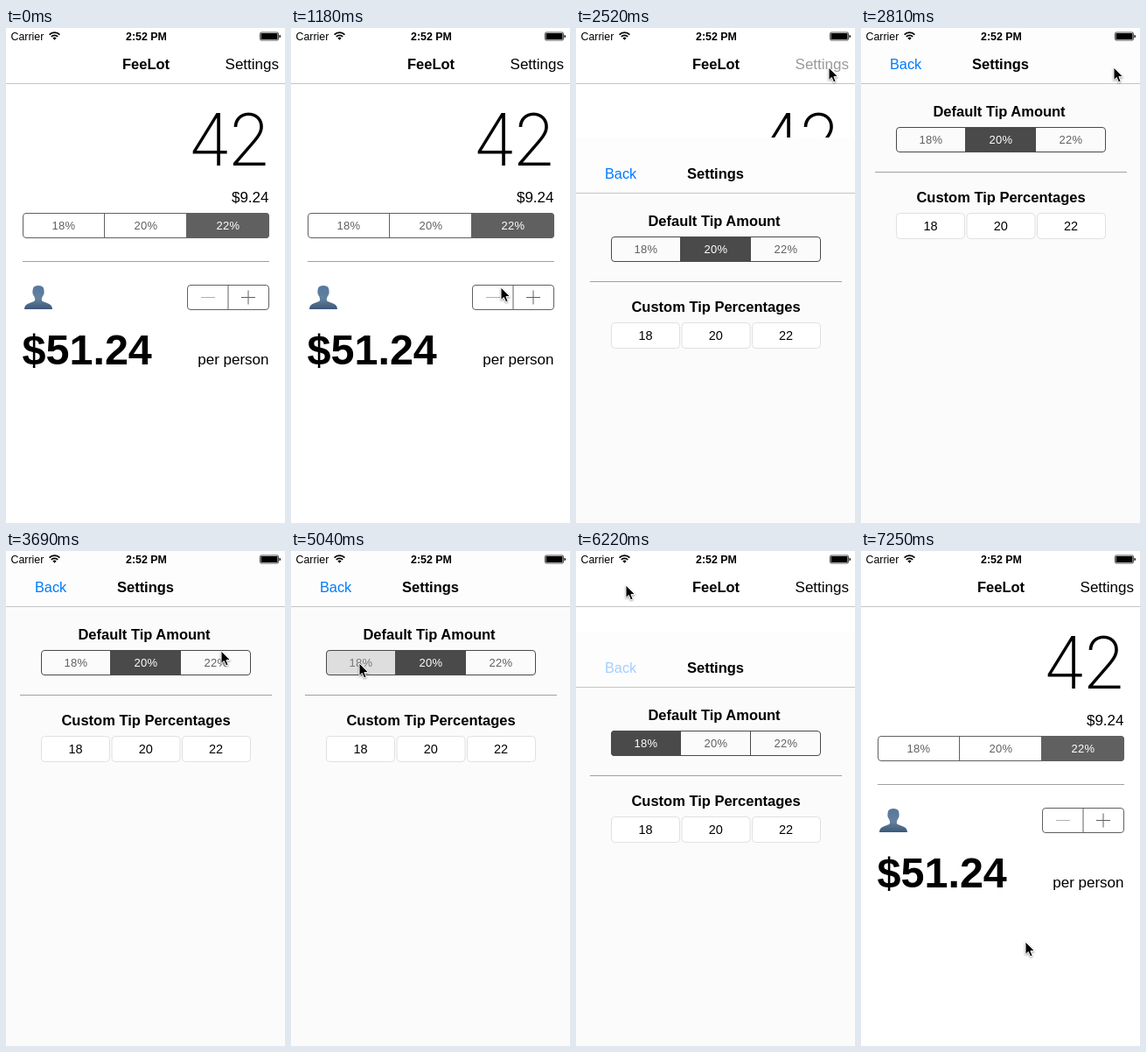
These frames come from a looping animation (319 by 565 pixels, 8 s). An HTML page:

```html
<!DOCTYPE html>
<html lang="en">
<head>
<meta charset="utf-8">
<title>Tip calculator</title>
<style>
  html, body { margin: 0; width: 100%; height: 100%; overflow: hidden; background: #fff; }
  svg { display: block; font: 17px "Liberation Sans", Arial, sans-serif; }
  .bold { font-weight: bold; font-size: 16.5px; }
  .mid { text-anchor: middle; }
  .end { text-anchor: end; }
  .status { font-size: 12.4px; }
  .seg { font-size: 13px; letter-spacing: .3px; }
  .field { font-size: 14.5px; }
  .amount { font: 200 82px Inter, Roboto, sans-serif; }
  .total { font-size: 48.5px; font-weight: bold; }
  #cursor { filter: drop-shadow(0 1px 1px rgba(0, 0, 0, .4)); }
</style>
</head>
<body>
<svg width="319" height="565" viewBox="0 0 319 565">
  <defs>
    <linearGradient id="blue" x2="0" y2="1">
      <stop stop-color="#56779c"/><stop offset=".55" stop-color="#64819f"/><stop offset="1" stop-color="#3c5878"/>
    </linearGradient>
  </defs>

  <g id="main">
    <path d="M0 63.5H319" stroke="#c4c4c4"/>
    <text class="bold mid" x="160" y="47">FeeLot</text>
    <text id="open" class="end" x="312" y="47">Settings</text>
    <text class="amount mid" x="233 278" y="157">42</text>
    <text class="end" x="300.5" y="198.5">$9.24</text>
    <g id="tips"></g>
    <path d="M19 266.5H301" stroke="#a0a0a0"/>
    <path fill="url(#blue)" d="M21 321C21 315 27 314 32 312C34 311 33 308 32 306C30 304 30 301 31 297C32 293 42 293 43 297C44 301 44 304 42 306C41 308 40 311 42 312C47 314 53 315 53 321Z"/>
    <g fill="none" stroke="#606060">
      <rect x="207.5" y="293.5" width="93" height="28" rx="3.5"/>
      <path d="M254 293.5V321.5M269 307.5H285M277 299.5V315.5"/>
      <path d="M223 307.5H239" stroke="#b0b0b0"/>
    </g>
    <text class="total" x="18.5" y="384">$51.24</text>
    <text class="end" x="300.5" y="383.5">per person</text>
  </g>

  <g id="panel">
    <rect width="319" height="566" fill="#fbfbfb"/>
    <rect width="319" height="63" fill="#fdfdfd"/>
    <path d="M0 63.5H319" stroke="#c4c4c4"/>
    <text id="back" x="33" y="47" font-size="16.3" fill="#007aff">Back</text>
    <text class="bold mid" x="159.5" y="47">Settings</text>
    <text class="bold mid" x="158" y="100.5">Default Tip Amount</text>
    <g id="defaults"></g>
    <path d="M16 164.5H304" stroke="#a0a0a0"/>
    <text class="bold mid" x="160" y="198.5">Custom Tip Percentages</text>
    <g id="fields"></g>
  </g>

  <g class="status">
    <text x="5.5" y="14">Carrier</text>
    <text class="mid" x="160.5" y="14" font-weight="bold">2:52 PM</text>
    <g fill="none" stroke="#000" stroke-width="1.7">
      <path d="M49.6 7.6A8.2 8.2 0 0 1 61.4 7.6M51.8 9.9A5.2 5.2 0 0 1 59.2 9.9"/>
    </g>
    <path d="M53.4 11.6A3 3 0 0 1 57.6 11.6L55.5 13.8Z"/>
    <rect x="290.5" y="5" width="21" height="9" rx="1.5" fill="none" stroke="#000" stroke-width=".7"/>
    <rect x="291.5" y="6" width="19" height="7" rx=".6"/>
    <path d="M312.5 7.8Q314 8 314 9.5T312.5 11.2Z"/>
  </g>

  <path id="cursor" d="M0 0V14.5L3.3 11.5L5.6 16.9L8.1 15.8L5.9 10.6H10.6Z" stroke="#fff" stroke-width="1"/>
</svg>
<script>
const $ = id => document.getElementById(id);
const LOOP = 8000, STEPS = 54;
const rates = [18, 20, 22];

// Screen updates come in even steps; keys are [step, ...values].
const path = [
  [2, 56, 528], [3, 78, 506], [5, 133, 461], [7, 133, 461],
  [8, 240, 296], [9, 280, 150], [10, 301, 75], [11, 297, 50], [12, 289, 45], [20, 289, 45],
  [21, 284, 55], [23, 253, 103], [25, 239, 125], [30, 239, 125],
  [31, 215, 135], [32, 150, 142], [33, 90, 133], [34, 78, 128], [37, 78, 128],
  [38, 73, 103], [39, 60, 54], [40, 57, 39], [45, 57, 39],
  [46, 75, 92], [47, 135, 280], [48, 178, 412], [49, 188, 446]
];
const slide = [
  [15, 566], [16, 441], [17, 125], [18, 16], [19, 0],
  [41, 0], [42, 92], [43, 385], [44, 566]
];

function at(keys, n) {
  const i = keys.findIndex(k => k[0] > n);
  if (i < 1) return keys.at(i).slice(1);
  const a = keys[i - 1], b = keys[i], p = (n - a[0]) / (b[0] - a[0]);
  return a.slice(1).map((v, j) => v + (b[j + 1] - v) * p);
}

// Segmented control with one chosen and possibly one pressed segment.
function segments(x, y, w, color, chosen, pressed = -1) {
  const cell = w / 3, r = 4, h = 29;
  const shape = [
    `M${x + cell} ${y}H${x + r}Q${x} ${y} ${x} ${y + r}V${y + h - r}Q${x} ${y + h} ${x + r} ${y + h}H${x + cell}Z`,
    `M${x + cell} ${y}h${cell}v${h}h${-cell}Z`,
    `M${x + 2 * cell} ${y}H${x + w - r}Q${x + w} ${y} ${x + w} ${y + r}V${y + h - r}Q${x + w} ${y + h} ${x + w - r} ${y + h}H${x + 2 * cell}Z`
  ];
  const fill = i => i === chosen ? color : i === pressed ? '#dedede' : 'none';
  const line = i => Math.floor(x + i * cell) - .5;
  return shape.map((d, i) => `<path d="${d}" fill="${fill(i)}"/>`).join('') +
    `<rect x="${x + .5}" y="${y + .5}" width="${w - 1}" height="${h - 1}" rx="3.5" fill="none" stroke="${color}"/>` +
    `<path d="M${line(1)} ${y}v${h}M${line(2)} ${y}v${h}" stroke="${color}"/>` +
    rates.map((rate, i) => `<text class="seg mid" x="${x + (i + .5) * cell}" y="${y + 19}" fill="${
      i === chosen ? '#fff' : i === pressed ? '#777' : '#606060'}">${rate}%</text>`).join('');
}

$('tips').innerHTML = segments(19, 211, 282, '#606060', 2);
$('fields').innerHTML = rates.map((rate, i) =>
  `<rect x="${40.5 + i * 80.5}" y="211.5" width="78" height="29" rx="4" fill="#fff" stroke="#e0e0e0"/>` +
  `<text class="field mid" x="${79.5 + i * 80.3}" y="231">${rate}</text>`).join('');

const move = (el, x, y) => el.setAttribute('transform', `translate(${x} ${y})`);
let last = -1;

function draw(now) {
  const n = Math.floor((now % LOOP + 12) / LOOP * STEPS) % STEPS;
  if (n !== last) {
    last = n;
    const [top] = at(slide, n);
    move($('panel'), 0, top);
    move($('cursor'), ...at(path, n));
    $('cursor').style.display = n < 2 ? 'none' : '';
    $('open').setAttribute('fill', n >= 15 && n < 19 ? '#999' : '#000');
    $('back').setAttribute('opacity', n === 41 ? .2 : n === 42 ? .35 : 1);
    $('defaults').innerHTML = segments(40, 113, 240, '#4a4a4a', n < 35 ? 1 : 0, n === 34 ? 0 : -1);
  }
  requestAnimationFrame(tick);
}

let start;
function tick(now) {
  start ??= now;
  draw(now - start);
}
draw(0);
</script>
</body>
</html>
```
